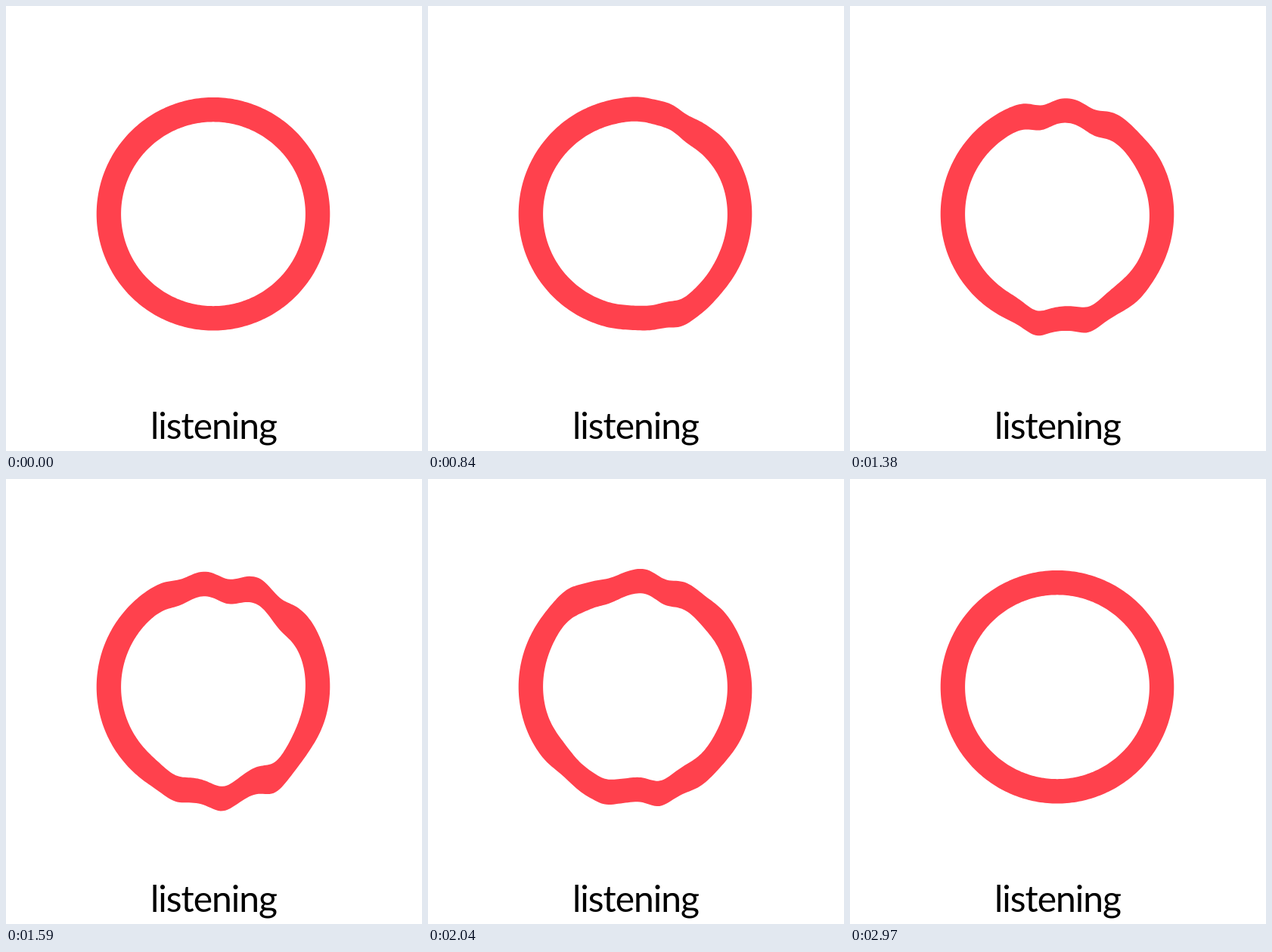
These frames come from a looping animation (550 by 589 pixels, 3000 ms). An HTML page:

```html
<!DOCTYPE html>
<html lang="en">
<head>
<meta charset="utf-8">
<title>listening</title>
<style>
  html, body { margin: 0; width: 100%; height: 100%; overflow: hidden; background: #fff; }
  svg { display: block; width: 550px; height: 589px; }
  text { font: 48px Lato, "Open Sans", sans-serif; letter-spacing: -1px; text-anchor: middle; }
</style>
</head>
<body>
<svg viewBox="0 0 550 589">
  <path id="ring" fill="#ff414d" fill-rule="evenodd"/>
  <text x="274.5" y="573">listening</text>
</svg>
<script>
const LOOP = 3000, STEP = 30;
const CX = 274, CY = 275.25, OUTER = 154.3, INNER = 121.9;
const DRIFT = 0.11;  // leftward travel, px per ms
const SLANT = 0.026; // ripples lean left towards the bottom
const SPREAD = 13.5; // half width of a ripple

// Ripples of each pose: x at the top of the ring, vertical push
const swell = [[250, -9], [292, 6], [348, 5]];
const poses = [
  { at: 630, ripples: [[296, 8], [343, -6], [366, 10]] },
  { at: 1050, ripples: swell },
  { at: 1380, ripples: [[254, 9], [324, 8], [388, 3]] },
  { at: 1770, ripples: [[270, 8], [318, -4], [344, 9.5], [390, -4]] },
  { at: 2340, ripples: [[150, -6], [180, 4], [332, 9], [396, 7]] },
  { at: 2610, ripples: swell }
];

const smooth = (a, b, v) => {
  const u = Math.min(1, Math.max(0, (v - a) / (b - a)));
  return u * u * (3 - 2 * u);
};

function push(pose, x, y, t) {
  const px = x + SLANT * (y - CY + OUTER) + DRIFT * (t - pose.at);
  return pose.ripples.reduce(
    (sum, [rx, height]) => sum + height * Math.exp(-(((px - rx) / SPREAD) ** 2) / 2), 0);
}

function warpAt(t) {
  const gain = smooth(0, 540, t) * (1 - smooth(2520, 2960, t));
  const next = poses.findIndex(p => p.at > t);
  const to = poses.at(next);
  const from = next > 0 ? poses[next - 1] : to;
  const mix = from === to ? 1 : smooth(from.at, to.at, t);
  const level = gain / Math.hypot(mix, 1 - mix); // keeps the swing steady while blending
  return (x, y) => level * (push(from, x, y, t) * (1 - mix) + push(to, x, y, t) * mix);
}

function outline(r, warp) {
  const points = [];
  for (let i = 0; i < 300; i++) {
    const a = i / 300 * 2 * Math.PI;
    const x = CX + r * Math.cos(a), y = CY + r * Math.sin(a);
    points.push(x.toFixed(2) + " " + (y + warp(x, y)).toFixed(2));
  }
  return "M" + points.join("L") + "Z";
}

const ring = document.getElementById("ring");
const start = performance.now();

function draw(now) {
  const t = Math.floor(Math.max(0, now - start) % LOOP / STEP) * STEP;
  const warp = warpAt(t);
  ring.setAttribute("d", outline(OUTER, warp) + outline(INNER, warp));
  requestAnimationFrame(draw);
}
draw(start);
</script>
</body>
</html>
```
